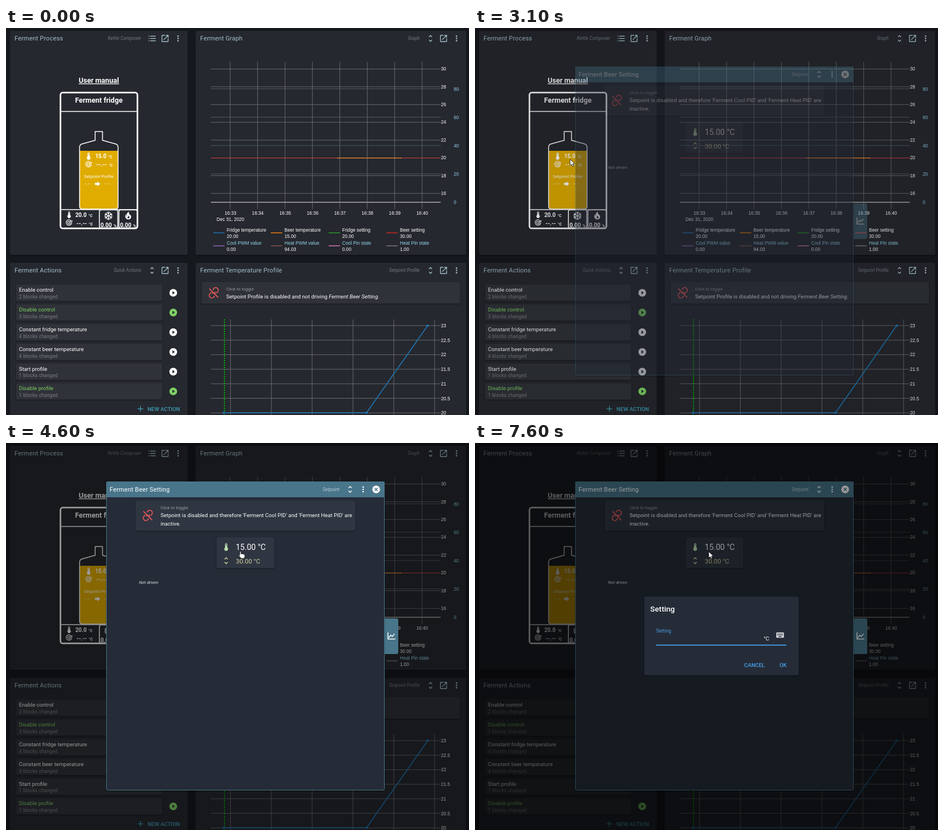
Animation of 818 by 684 pixels, one loop 8000 ms. Source, as an HTML page:

```html
<!DOCTYPE html>
<html lang="en">
<head>
<meta charset="utf-8">
<title>Ferment dashboard</title>
<style>
html, body { margin: 0; width: 100%; height: 100%; overflow: hidden; background: #15181d; }
svg { display: block; width: 818px; height: 684px; font-family: Roboto, sans-serif; }
text { white-space: pre; }
.plot { font-family: "Liberation Sans", Arial, sans-serif; }
.raised { filter: drop-shadow(0 1px 1px #0006); }
</style>
</head>
<body>
<svg id="stage" viewBox="0 0 818 684"></svg>
<script>
const TITLE = '#a4c0cb', GREEN = '#7fd065', RED = '#e5595c', TEAL = '#48758a', BLUE = '#4aa3ee';
const GRID = '#66696d', CYAN = '#93d3ec', YELLOW = '#e0ac00';

const text = (x, y, s, size, fill = '#fff', more = '') =>
  `<text x="${x}" y="${y}" font-size="${size}" fill="${fill}" ${more}>${s}</text>`;
const rect = (x, y, w, h, fill, more = '') =>
  `<rect x="${x}" y="${y}" width="${w}" height="${h}" fill="${fill}" ${more}/>`;
const line = (x1, y1, x2, y2, stroke, width = 1, more = '') =>
  `<line x1="${x1}" y1="${y1}" x2="${x2}" y2="${y2}" stroke="${stroke}" stroke-width="${width}" ${more}/>`;
const circle = (x, y, r, fill, more = '') => `<circle cx="${x}" cy="${y}" r="${r}" fill="${fill}" ${more}/>`;
const path = (d, fill, more = '') => `<path d="${d}" fill="${fill}" ${more}/>`;
const stroked = (d, color, width = 2) =>
  path(d, 'none', `stroke="${color}" stroke-width="${width}" stroke-linejoin="round"`);
const each = (list, fn) => list.map(fn).join('');
const range = (n, fn) => each([...Array(n).keys()], fn);

const MIDDLE = 'text-anchor="middle"', END = 'text-anchor="end"';
const BOLD = 'font-weight="700"', MEDIUM = 'font-weight="500"', ITALIC = 'font-style="italic"';

// Icons live on a 24 unit grid and are placed by their centre.
const shapes = {
  open: c => path('M14 3V5H17.6L7.8 14.8 9.2 16.2 19 6.4V10H21V3ZM19 19H5V5H12V3H5A2 2 0 0 0 3 5V19A2 2 0 0 0 5 21H19A2 2 0 0 0 21 19V12H19Z', c),
  unfold: c => path('M12 18.2 8.8 15 7.4 16.4 12 21 16.6 16.4 15.2 15ZM12 5.8 15.2 9 16.6 7.6 12 3 7.4 7.6 8.8 9Z', c),
  dots: c => each([6, 12, 18], y => circle(12, y, 2, c)),
  list: c => each([5, 11, 17], y => rect(3, y, 2.4, 2, c) + rect(7.5, y, 14, 2, c)),
  thermo: c => path('M15 13V5A3 3 0 0 0 9 5V13A5 5 0 1 0 15 13M12 4A1 1 0 0 1 13 5V8H11V5A1 1 0 0 1 12 4Z', c),
  target: c => stroked('M20 9A9 9 0 1 1 15 3.5M16 11A4.5 4.5 0 1 1 12.5 7.5M12 12 18 6M17 3V7H21L23 5', c, 2.2),
  unlink: c => stroked('M10 5.5 12 3.5A5 5 0 0 1 20 10L17 13M14 18.5 12 20.5A5 5 0 0 1 4 14L7 11M10.5 9A5 5 0 0 0 10 14M14 10A5 5 0 0 1 14 15.5M3 3.5 21 21.5', c),
  arrow: c => path('M3 8.5H12V3.5L22 12 12 20.5V15.5H3Z', c),
  snow: c => range(6, i => `<g transform="rotate(${i * 60} 12 12)">${stroked('M12 12V2M8.5 3.5 12 7 15.5 3.5', c, 1.7)}</g>`),
  fire: c => path('M17.7 11.2C16 9.5 12 8 14 3 9 4.5 7.5 9.5 9.1 13.5 8.7 14.4 7.3 13.5 7.4 8.7 4.5 11 4.3 15 6 17.7 8.5 21.8 14.5 22 17 19.3 19.5 17 19.2 13.4 17.7 11.2ZM14.5 17.5C12.5 19.5 9.8 18.3 9.6 16.3 12 16 11.6 14 12 11.5 13 13.5 16 15 14.5 17.5Z', c, 'fill-rule="evenodd"'),
  chart: c => stroked('M3 3V20H22M5 17 10 10 14 13.5 20 6.5', c, 2.2),
  plus: c => stroked('M12 4V20M4 12H20', c),
  keyboard: c => rect(2, 5, 20, 14, c, 'rx="2"') +
    each([8, 11], y => range(5, i => rect(4.5 + i * 3.2, y, 2, 2, '#252c38'))) + rect(8, 15, 8, 2, '#252c38'),
  close: (c, hole) => circle(12, 12, 10, c) + stroked('M8 8 16 16M16 8 8 16', hole, 2.2),
  play: (c, hole) => circle(12, 12, 10, c) + path('M10 16.5V7.5L16 12Z', hole),
};
const icon = (name, x, y, color, size = 16.4, hole) =>
  `<g transform="translate(${x - size / 2} ${y - size / 2}) scale(${size / 24})">${shapes[name](color, hole)}</g>`;

const panel = (x, y, w, h, title, kind, first) =>
  rect(x, y, w, h, '#25282e', 'rx="2" class="raised"') +
  text(x + 8, y + 17, title, 11, TITLE, 'letter-spacing=".18"') +
  text(x + w - 82, y + 16, kind, 8.2, '#717b83', ITALIC + END) +
  icon(first, x + w - 63, y + 13.5, TITLE) + icon('open', x + w - 40, y + 13.5, TITLE) +
  icon('dots', x + w - 17, y + 13.5, TITLE);

const reading = (x, y, value, unit) =>
  text(x, y, value, 10, '#fff', BOLD + END) + text(x + 3, y, unit, 7, '#fff', BOLD);

function processPanel() {
  return panel(7, 5, 314, 396, 'Ferment Process', 'Kettle Composer', 'list') +
    text(164, 97, 'User manual', 12.6, '#fff', BOLD + MIDDLE + ' text-decoration="underline"') +
    rect(96.2, 114.2, 136, 240, 'none', 'rx="4" stroke="#fff" stroke-width="2.8"') +
    text(164, 132, 'Ferment fridge', 12.6, '#fff', BOLD + MIDDLE) +
    line(96, 147.5, 232, 147.5, '#fff', 1.6) + line(96, 321, 232, 321, '#fff', 1.6) +
    path('M130 217H198V315Q198 320 193 320H135Q130 320 130 315Z', YELLOW) +
    stroked('M157.5 183H170.5V198.5L194 205Q198 206.5 198 211V315Q198 320 193 320H135Q130 320 130 315V211Q130 206.5 134 205L157.5 198.5Z', '#fff', 1.5) +
    icon('thermo', 146, 226.5, '#fff', 15) + reading(177.5, 230, '15.0', '°C') +
    icon('target', 146, 241, '#fff', 13) + reading(178, 244.5, '--.--', '°C') +
    text(164, 264.5, 'Setpoint Profile', 7.7, '#fff', MIDDLE) +
    text(144, 278, '--.--', 7.7, '#fff', MIDDLE) + text(179, 278, '--.--', 7.7, '#fff', MIDDLE) +
    icon('arrow', 161.5, 275.5, '#fff', 12) +
    icon('thermo', 111.5, 330, '#fff', 14) + reading(142.5, 334, '20.0', '°C') +
    icon('target', 111.5, 344, '#fff', 13) + reading(143, 348.5, '--.--', '°C') +
    each([165, 199.5], x => rect(x, 321.5, 32.5, 32, 'none', 'rx="3" stroke="#fff" stroke-width="1.6"') +
      reading(x + 22, 351.5, '0.00', '%')) +
    icon('snow', 181, 332, '#fff', 18) + icon('fire', 216, 331.5, '#fff', 18);
}

function graphPanel() {
  const legend = [
    ['Fridge temperature', '20.00', '#1f77b4'], ['Beer temperature', '15.00', '#ff7f0e'],
    ['Fridge setting', '20.00', '#2ca02c'], ['Beer setting', '30.00', '#d62728'],
    ['Cool PWM value', '0.00', '#9467bd'], ['Heat PWM value', '94.03', '#8c564b'],
    ['Cool Pin state', '0.00', '#e377c2'], ['Heat Pin state', '1.00', '#7f7f7f']];
  return panel(335, 5, 478, 396, 'Ferment Graph', 'Graph', 'unfold') + '<g class="plot">' +
    range(8, i => line(396 + i * 48.45, 60, 396 + i * 48.45, 320, GRID) +
      text(396.5 + i * 48.4, 330, '16:' + (33 + i), 8.22, '#fff', MIDDLE)) +
    text(396.5, 341, 'Dec 31, 2020', 8.22, '#fff', MIDDLE) +
    range(8, i => line(362, 72.5 + i * 31.4, 768, 72.5 + i * 31.4, GRID) +
      text(768.5, 75.2 + i * 31.4, 30 - 2 * i, 8.22)) +
    range(5, i => line(362, 107.5 + i * 50.1, 768, 107.5 + i * 50.1, i == 2 ? '#475a68' : '#55595e') +
      text(791, 110.8 + i * 50.1, 80 - 20 * i, 8.22, CYAN)) +
    line(362, 308, 768, 308, '#8d8a8c', 1.8) +
    line(362, 229.7, 768, 229.7, '#b93b40', 1.3) + line(585, 229.7, 699, 229.7, '#e8892c', 1.3) +
    each(legend, ([name, value, color], i) => {
      const x = 366 + i % 4 * 102, y = i < 4 ? 362 : 385;
      return line(x, y, x + 20, y, color, 1.4) + text(x + 24, y - 1.8, name, 8.22, i < 4 ? '#fff' : CYAN) +
        text(x + 24, y + 9.2, value, 8.22);
    }) + '</g>';
}

function actionsPanel() {
  const actions = [['Enable control', 2], ['Disable control', 3], ['Constant fridge temperature', 4],
    ['Constant beer temperature', 4], ['Start profile', 1], ['Disable profile', 1]];
  return panel(7, 415, 314, 280, 'Ferment Actions', 'Quick Actions', 'unfold') +
    each(actions, ([name, count], i) => {
      const y = 468 + i * 34.85, on = name.startsWith('Disable');
      return rect(18, y - 14.5, 258, 29, '#2f3238', 'rx="2" class="raised"') +
        text(23, y - 1.8, name, 9.59, on ? GREEN : '#fff') +
        text(23, y + 10, `${count} block${'s'} changed`, 8.22, '#7d8084', 'letter-spacing=".27"') +
        icon('play', 295.5, y, on ? GREEN : '#fff', 16.4, '#25282e');
    }) +
    icon('plus', 237.5, 673, '#3f9fb7', 15) + text(250, 676.5, 'NEW ACTION', 9.59, '#3f9fb7', MEDIUM);
}

function profilePanel() {
  return panel(335, 415, 478, 280, 'Ferment Temperature Profile', 'Setpoint Profile', 'unfold') +
    rect(346, 449, 456, 38, '#2f3238', 'rx="2" class="raised"') + icon('unlink', 367, 468, RED, 21) +
    text(389, 463.5, 'Click to toggle', 7.7, '#94979b') +
    text(389, 477.5, `Setpoint Profile is disabled and not driving <tspan ${ITALIC}>Ferment Beer Setting.</tspan>`, 9.59) +
    '<g class="plot">' +
    range(6, i => line(396.7 + i * 72.1, 515, 396.7 + i * 72.1, 684, GRID)) +
    range(7, i => line(362, 526 + i * 25.7, 768, 526 + i * 25.7, GRID) +
      text(768.5, 529 + i * 25.7, 23 - i / 2, 8.22)) +
    line(386, 515, 386, 684, '#00c400', 1.8, 'stroke-dasharray="2 2"') +
    stroked('M385 680H637L745 526', '#1f77b4', 1.5) +
    each([[385, 680], [637, 680], [745, 526]], ([x, y]) => circle(x, y, 2.1, '#1f77b4')) + '</g>';
}

function settingWindow() {
  return path('M669 310H690Q693 310 693 313V370Q693 373 690 373H669Z', TEAL) + icon('chart', 681, 341, '#fff') +
    rect(177.5, 68.5, 491, 545, '#252b37', `rx="2" stroke="${TEAL}" class="raised"`) + rect(177, 68, 492, 28, TEAL, 'rx="2"') +
    text(183, 85.5, 'Ferment Beer Setting', 11, '#fff', 'letter-spacing=".18"') +
    text(589, 84.5, 'Setpoint', 8.2, '#b9cdd6', ITALIC + END) +
    icon('unfold', 608, 82, '#fff') + icon('dots', 631, 82, '#fff') + icon('close', 654, 82, '#fff', 16.4, TEAL) +
    rect(229, 101.5, 388, 53.5, '#2f3541', 'rx="2" class="raised"') + icon('unlink', 250.5, 128, RED, 21) +
    text(273, 117, 'Click to toggle', 7.7, '#9a9da3') +
    text(273, 131, "Setpoint is disabled and therefore 'Ferment Cool PID' and 'Ferment Heat PID' are", 9.59) +
    text(273, 145.5, 'inactive.', 9.59) +
    rect(372, 166.5, 102, 54.5, '#2f3541', 'rx="2" class="raised"') +
    icon('thermo', 389, 184, '#b9dcae') + text(406, 189, '15.00 °C', 14) +
    icon('unfold', 389, 208, '#dcd79f') + text(406, 212.5, '30.00 °C', 11.4, '#d6d2a0') +
    text(235, 248.5, 'Not driven', 7.7, '#dfe1e4', ITALIC);
}

function inputDialog() {
  return rect(299, 271.5, 273, 139, '#252c38', 'rx="3" class="raised"') +
    text(309.5, 298, 'Setting', 13.7, '#fff', MEDIUM) + text(320, 335, 'Setting', 8.2, BLUE, 'letter-spacing=".15"') +
    text(320.5, 350.8, '', 16.4, '#fff', 'id="value"') + rect(0, 335, 1, 20, '#fff', 'id="caret"') +
    `<g id="suffix">${text(493, 348.5, '°C', 9.59)}${icon('keyboard', 522, 339.5, '#d5d8dc')}</g>` +
    `<g id="clear">${icon('close', 543, 340, '#c3c6cb', 15.6, '#252c38')}</g>` +
    line(320, 357.3, 550, 357.3, '#8b9097') + rect(320, 356.5, 230, 1.6, BLUE, 'id="underline"') +
    text(475.5, 396.3, 'CANCEL', 9.59, BLUE, MEDIUM) + text(538, 396.3, 'OK', 9.59, BLUE, MEDIUM);
}

const backdrop = id => rect(0, 0, 818, 684, '#000', `id="${id}"`);
const OUTLINE = 'stroke="#111" stroke-width=".8" stroke-linejoin="round"';
document.getElementById('stage').innerHTML =
  processPanel() + graphPanel() + actionsPanel() + profilePanel() +
  backdrop('shade') + `<g id="window">${settingWindow()}</g>` +
  backdrop('shade2') + `<g id="dialog">${inputDialog()}</g>` +
  `<g id="cursor"><g id="arrow">${path('M0 0V11.2L2.6 8.8 4.3 12.6 6.2 11.8 4.5 8.1H8.2Z', '#fff', OUTLINE)}</g>
   <g id="hand">${path('M0 0Q1.2-1 2.2 0V4L4 3.8 5.6 4.2 7.4 4.7 9 5.6V8.5L8 12H2.2L0 9-2 6.8Q-1.2 5 0 6.5Z', '#fff', OUTLINE)}</g></g>`;

const el = id => document.getElementById(id);
const set = (id, name, value) => el(id).setAttribute(name, value);
const show = (id, on) => set(id, 'visibility', on ? 'inherit' : 'hidden');

// Piecewise linear track of [time, ...values].
function track(keys, t) {
  const i = keys.findIndex(k => k[0] > t);
  if (i < 0) return keys.at(-1).slice(1);
  if (i == 0) return keys[0].slice(1);
  const [a, b] = [keys[i - 1], keys[i]], f = (t - a[0]) / (b[0] - a[0]);
  return a.slice(1).map((v, k) => v + (b[k + 1] - v) * f);
}
const pointer = [[1200, 14, 1], [1300, 34, 26], [1500, 95, 100], [1700, 158, 174], [1800, 172, 194],
  [2000, 170, 219], [2100, 169, 227], [2200, 168, 232], [3900, 168, 232], [4100, 222, 224], [4400, 370, 201], [4600, 413, 192]];
const windowFade = [[2900, 0], [3000, .06], [3100, .37], [3200, .78], [3300, .97], [3400, 1]];

function draw(t) {
  const [x, y] = track(pointer, t), [fade] = track(windowFade, t);
  const hand = t >= 1700 && t < 3000 || t >= 4500 && t < 5600;
  show('cursor', t >= 1200);
  show('arrow', !hand);
  show('hand', hand);
  set('cursor', 'transform', `translate(${x} ${y})`);
  set('shade', 'opacity', fade * .4);
  set('window', 'opacity', fade);

  const opened = t >= 5900, scale = opened ? 1 : .782;
  show('dialog', t >= 5600);
  set('shade2', 'opacity', t < 5600 ? 0 : opened ? .4 : .2);
  set('dialog', 'opacity', opened ? 1 : .62);
  set('dialog', 'transform', `translate(435.5 341) scale(${scale}) translate(-435.5 -341)`);
  set('underline', 'transform', `translate(435 0) scale(${opened ? 1 : .55} 1) translate(-435 0)`);

  const value = t < 7100 ? '30' : t < 7600 ? '3' : '';
  el('value').textContent = value;
  set('caret', 'x', 320.6 + value.length * 9.2);
  show('caret', t < 6200 || t >= 6800 && t < 7400);
  show('clear', value);
  set('suffix', 'transform', `translate(${value ? 0 : 17} 0)`);
}

function frame(now) {
  draw(Math.floor(now % 8000 / 100) * 100);
  requestAnimationFrame(frame);
}
requestAnimationFrame(frame);
</script>
</body>
</html>
```
